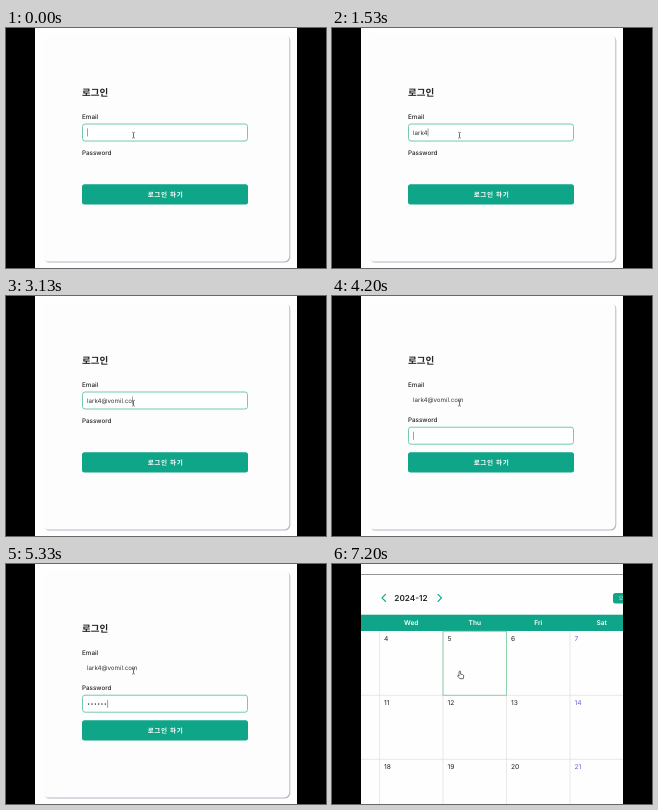
An HTML page that plays this animation: 320x240 px, repeating every 7.27 s.

```html
<!DOCTYPE html>
<html lang="ko">
<head>
<meta charset="utf-8">
<title>로그인</title>
<style>
  html, body { margin: 0; width: 100%; height: 100%; overflow: hidden; background: #000; }
  svg { display: block; width: 320px; height: 240px; }
  text { font: 6.3px Inter, "Noto Sans CJK KR", "Noto Sans CJK", sans-serif; fill: #222; text-rendering: geometricPrecision; }
  .title { font-size: 9.5px; font-weight: 700; }
  .label { font-weight: 500; }
  .value { font-size: 6.2px; fill: #333; }
  .submit { font-size: 6.6px; font-weight: 600; letter-spacing: .6px; fill: #fff; text-anchor: middle; }
  .month { font-size: 8.2px; font-weight: 600; }
  .weekday { font-size: 6.6px; font-weight: 600; fill: #fff; text-anchor: middle; }
  .day { font-size: 6.7px; }
  .sat { fill: #6464d8; }
  .teal { fill: #0fa588; }
  .line { fill: none; stroke: #e0e5e2; stroke-width: .8; }
  .chevron { fill: none; stroke: #0fa588; stroke-width: 1.2; stroke-linecap: round; stroke-linejoin: round; }
  .card { fill: #fdfdfe; filter: drop-shadow(1px 1px .7px rgba(80, 85, 120, .42)); }
  .field { fill: #fff; stroke: #62c4a8; stroke-width: .9; }
  .caret { stroke: #777; stroke-width: .7; }
  .pointer { fill: none; stroke: #555; stroke-width: .6; }
</style>
</head>
<body>
<svg viewBox="0 0 320 240">
  <clipPath id="page"><rect x="29" width="262" height="240"/></clipPath>
  <g clip-path="url(#page)">
    <rect x="29" width="262" height="240" fill="#fefefe"/>

    <g id="login">
      <rect class="card" x="37" y="6.5" width="246.3" height="227" rx="5.5"/>
      <text class="title" x="76" y="67.9">로그인</text>
      <text class="label" x="76" y="91.2">Email</text>
      <text id="passwordLabel" class="label" x="76">Password</text>
      <rect id="field" class="field" x="76.5" width="165" height="17" rx="2.5"/>
      <text id="email" class="value" x="81"></text>
      <g id="dots" fill="#444"></g>
      <path id="caret" class="caret" d="M0 0v8"/>
      <rect class="teal" x="76" y="156.3" width="166" height="20.2" rx="2.5"/>
      <text class="submit" x="159.5" y="168.8">로그인 하기</text>
      <path class="pointer" d="M126 104.2q1.5 0 1.5 1v4q0 1-1.5 1M129 104.2q-1.5 0-1.5 1v4q0 1 1.5 1"/>
    </g>

    <g id="calendar">
      <path d="M29 10.5h262" stroke="#777d79" stroke-width=".8"/>
      <path class="chevron" d="M53.5 30.3l-3.5 3.5 3.5 3.5M106 30.3l3.5 3.5-3.5 3.5"/>
      <text class="month" x="62.3" y="36.7">2024-12</text>
      <rect class="teal" x="281" y="29" width="24" height="10.5" rx="2.5"/>
      <text x="286.5" y="36.3" style="font-size:5.5px;fill:#c9eee2">오늘</text>
      <g id="grid"></g>
      <rect class="teal" x="29" y="50.7" width="262" height="16.3"/>
      <g id="weekdays"></g>
      <rect x="111" y="67.3" width="63.5" height="64" fill="none" stroke="#86cfa5" stroke-width=".9"/>
      <path d="M127 112v-4q0-1 .8-1t.8 1v2.2l2.2.5q1 .3.9 1.4l-.4 2.6h-3.4l-2-2.4q-.6-.9.2-1z" fill="#fff" stroke="#333" stroke-width=".7" stroke-linejoin="round"/>
    </g>
  </g>
</svg>
<script>
  const LOOP = 7270, CALENDAR_AT = 6870, PASSWORD_AT = 3900;
  const EMAIL = "lark4@vomil.com";
  const emailKeys = { start: 700, step: 178, count: EMAIL.length };
  const passwordKeys = { start: 4330, step: 200, count: 8 };
  const $ = id => document.getElementById(id);

  const CELL = 63.5, LEFT = 47.5, TOP = 67.3, ROW = 64;
  let lines = "", days = "", names = "";
  ["Wed", "Thu", "Fri", "Sat"].forEach((name, col) => {
    const x = LEFT + col * CELL;
    lines += `M${x} ${TOP}V240`;
    names += `<text class="weekday" x="${x + CELL / 2}" y="61.3">${name}</text>`;
    for (let row = 0; row < 3; row++) {
      const tone = name === "Sat" ? "day sat" : "day";
      days += `<text class="${tone}" x="${x + 4.5}" y="${77.3 + row * ROW}">${4 + col + row * 7}</text>`;
    }
  });
  for (let row = 1; row < 3; row++) lines += `M29 ${TOP + row * ROW}H291`;
  $("grid").innerHTML = `<path class="line" d="${lines}"/>${days}`;
  $("weekdays").innerHTML = names;

  const PITCH = 3.35;
  $("dots").innerHTML = Array.from({ length: passwordKeys.count }, (_, i) =>
    `<circle cx="${82.6 + i * PITCH}" cy="140.1" r=".8"/>`).join("");
  const dots = [...$("dots").children];

  const typed = (t, { start, step, count }) =>
    Math.max(0, Math.min(count, Math.floor((t - start) / step) + 1));
  const show = (el, on) => el.style.display = on ? "" : "none";
  const setY = (id, y) => $(id).setAttribute("y", y);

  function draw(t) {
    const onCalendar = t >= CALENDAR_AT;
    show($("login"), !onCalendar);
    show($("calendar"), onCalendar);
    if (onCalendar) return;

    const onPassword = t >= PASSWORD_AT;
    const keys = onPassword ? passwordKeys : emailKeys;
    const n = typed(t, keys);
    $("email").textContent = EMAIL.slice(0, typed(t, emailKeys));
    dots.forEach((dot, i) => show(dot, onPassword && i < n));

    // The focus border takes up space, so the rows move slightly with it.
    setY("field", onPassword ? 131.2 : 96);
    setY("email", onPassword ? 106.3 : 106.7);
    setY("passwordLabel", onPassword ? 126.2 : 126.9);

    // The caret restarts its blink at every key press.
    const lastKey = n ? keys.start + (n - 1) * keys.step : onPassword ? PASSWORD_AT : 0;
    const width = onPassword ? n * PITCH : n ? $("email").getComputedTextLength() : 0;
    $("caret").setAttribute("transform", `translate(${81.5 + width} ${onPassword ? 135.8 : 100.4})`);
    show($("caret"), (t - lastKey) % 1000 < 500);
  }

  const begin = performance.now();
  function frame() {
    draw((performance.now() - begin) % LOOP);
    requestAnimationFrame(frame);
  }
  frame();
</script>
</body>
</html>
```
